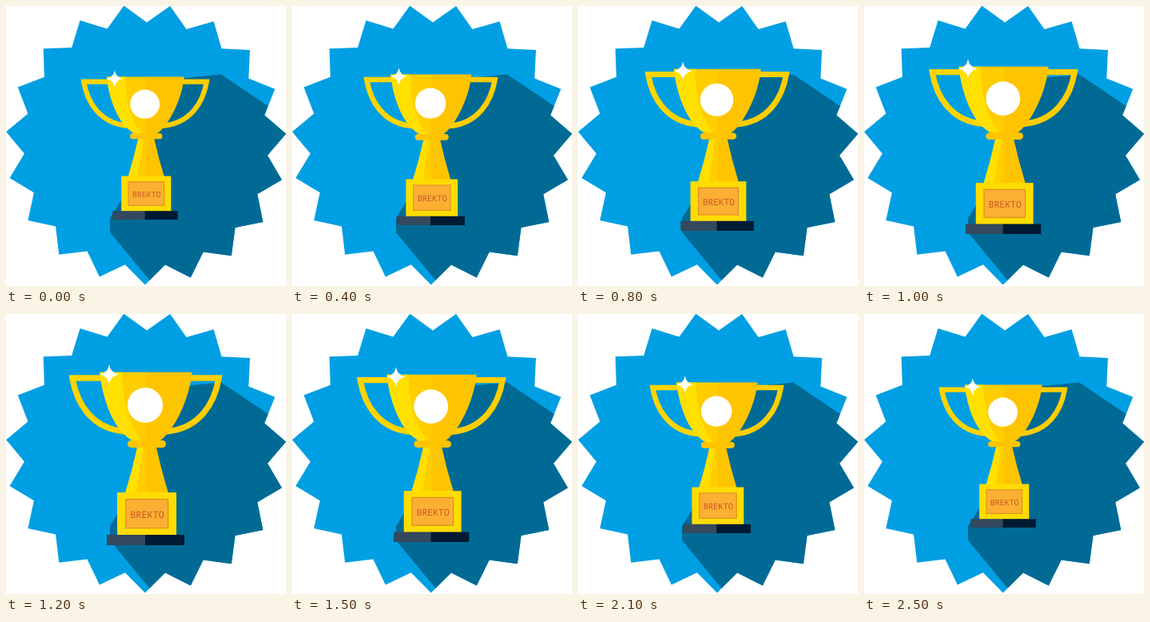
An HTML page that plays this animation: 350 px wide and 350 px high, repeating every 2600 ms.

```html
<!DOCTYPE html>
<html lang="en">
<head>
<meta charset="utf-8">
<title>Trophy badge</title>
<style>
  html, body { margin: 0; width: 100%; height: 100%; overflow: hidden; background: #fff; }
  svg { display: block; width: 100vw; height: 100vh; }
  text { font: 11.8px "Noto Sans Mono", monospace; fill: #cb5526; text-anchor: middle; text-rendering: geometricPrecision; }
</style>
</head>
<body>
<svg viewBox="0 0 350 350">
  <defs>
    <clipPath id="badge"><polygon class="burst"/></clipPath>
    <clipPath id="bowl"><path d="M117 72.700H232.500C230 104 210 148 190 160H162C134 148 121 106 117 72.700Z"/></clipPath>
    <clipPath id="column"><path d="M164 160H188V167Q194 195 203 224H149Q158 195 164 167Z"/></clipPath>
  </defs>
  <polygon class="burst" fill="#009fe3"/>
  <path clip-path="url(#badge)" fill="#006a95" d="M222 90L269 85.500L371 154V350H185.500L130 283V265L150 233L168 160Z"/>

  <g id="trophy">
    <g fill="none" stroke-width="7.5">
      <path stroke="#ffd500" d="M121 80H83C88 110 106 144 150 147"/>
      <path stroke="#ffce00" d="M228 80H266C261 110 243 144 199 147"/>
    </g>
    <g clip-path="url(#bowl)">
      <path fill="#ffcd00" d="M110 70H176V162H110Z"/>
      <path fill="#ffe000" d="M110 70H145C146 110 152 138 172 162H110Z"/>
      <path fill="#ffc400" d="M175 70H236V162H175Z"/>
    </g>
    <g clip-path="url(#column)">
      <path fill="#ffcd00" d="M145 160H176V224H145Z"/>
      <path fill="#ffe000" d="M145 160H173L163 224H145Z"/>
      <path fill="#ffc400" d="M175 160H205V224H175Z"/>
    </g>
    <rect x="152" y="158" width="48" height="9" rx="4.5" fill="#ffc400"/>
    <rect x="139" y="223" width="74" height="53.5" fill="#ffdc00"/>
    <rect x="149.600" y="231.600" width="53" height="36" fill="#fbb034" stroke="#e08f24" stroke-width="1.3"/>
    <text x="176.500" y="254.700">BREKTO</text>
    <path fill="#34485e" d="M126 276H175V289H126Z"/>
    <path fill="#001a33" d="M174 276H223V289H174Z"/>
    <circle cx="174" cy="114" r="22" fill="#fff"/>
    <path fill="#fff" d="M129 63Q130.500 73.500 141 75.500Q130.500 77.500 129 88Q127.500 77.500 117 75.500Q127.500 73.500 129 63Z"/>
  </g>
</svg>
<script>
  const TIPS = 19, TILT = 0.4 * Math.PI / 180;
  const LOOP = 2600, STEP = 100, GROWTH = 12;

  const burst = Array.from({ length: TIPS * 2 }, (_, i) => {
    const a = i * Math.PI / TIPS - TILT, r = i % 2 ? 152.5 : 175.5;
    return `${(175 + r * Math.sin(a)).toFixed(2)},${(173 + r * Math.cos(a)).toFixed(2)}`;
  }).join(" ");
  document.querySelectorAll(".burst").forEach(p => p.setAttribute("points", burst));

  // step, left, right, top, bottom of the trophy
  const keys = [
    [0, 93, 255, 88, 267],
    [4, 89, 258, 85, 274],
    [6, 87, 261, 82, 277],
    [8, 83, 265, 78, 281],
    [12, 78, 271, 72, 289]
  ];
  const [, L, R, T, B] = keys[4];

  function boxAt(step) {
    const i = Math.max(1, keys.findIndex(k => k[0] >= step));
    const a = keys[i - 1], b = keys[i], u = (step - a[0]) / (b[0] - a[0]);
    return a.map((v, j) => v + (b[j] - v) * u);
  }

  const trophy = document.getElementById("trophy");

  function draw() {
    const tick = Math.floor(performance.now() % LOOP / STEP);
    const [, l, r, t, b] = boxAt(tick <= GROWTH ? tick : 2 * GROWTH + 1 - tick);
    const sx = (r - l) / (R - L), sy = (b - t) / (B - T);
    trophy.setAttribute("transform", `matrix(${sx} 0 0 ${sy} ${l - L * sx} ${t - T * sy})`);
    requestAnimationFrame(draw);
  }
  draw();
</script>
</body>
</html>
```
